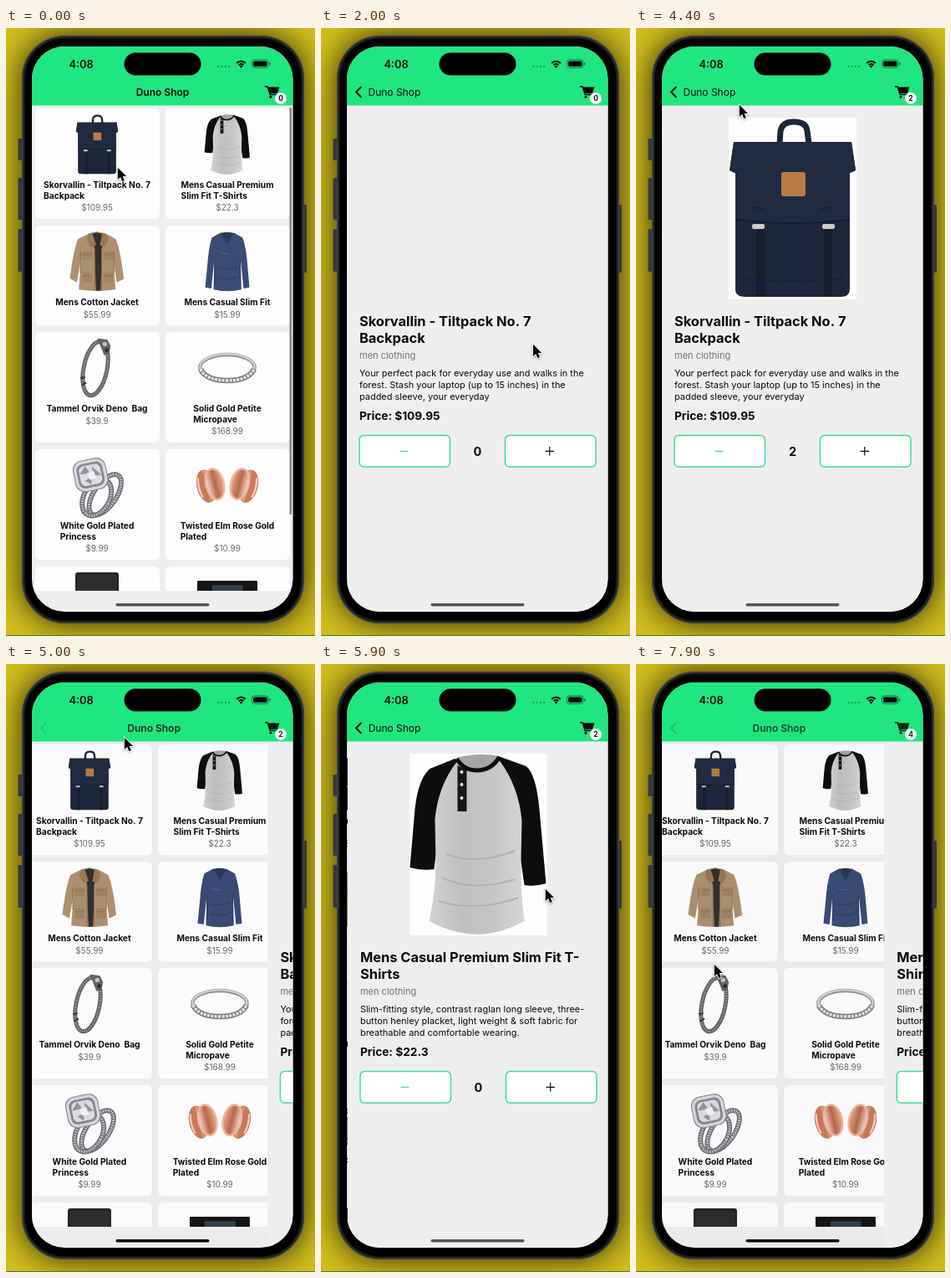
An HTML page with a canvas that plays this animation: 370x726 px, repeating every 8000 ms.

```html
<!DOCTYPE html>
<html lang="en">
<head>
<meta charset="utf-8">
<title>Shop app</title>
<style>
html, body { margin: 0; width: 100%; height: 100%; overflow: hidden; background: #cbb61b; }
canvas { display: block; width: 370px; height: 726px; }
</style>
</head>
<body>
<canvas id="stage"></canvas>
<script>
const W = 370, H = 726, LOOP = 8000;
const canvas = document.getElementById('stage');
const g = canvas.getContext('2d');
const dpr = window.devicePixelRatio || 1;
canvas.width = W * dpr;
canvas.height = H * dpr;

const GREEN = '#1fe67f', PAGE = '#eeeeee', INK = '#0b0b0b', GREY = '#6b6b6b';
const SCREEN = { x: 31, y: 22, w: 312.5, h: 675, r: 39 };
const SHOP = 'Duno Shop';

// ---- drawing helpers ----
function box(x, y, w, h, r, fill, stroke, lw = 1) {
  g.beginPath();
  g.roundRect(x, y, w, h, r);
  if (fill) { g.fillStyle = fill; g.fill(); }
  if (stroke) { g.strokeStyle = stroke; g.lineWidth = lw; g.stroke(); }
}
function oval(x, y, rx, ry, fill) {
  g.beginPath();
  g.ellipse(x, y, rx, ry, 0, 0, Math.PI * 2);
  g.fillStyle = fill;
  g.fill();
}
function disc(x, y, r, fill) {
  oval(x, y, r, r, fill);
}
function fillPath(d, color) {
  g.fillStyle = color;
  g.fill(new Path2D(d));
}
function line(d, color, lw, dash = []) {
  g.strokeStyle = color;
  g.lineWidth = lw;
  g.setLineDash(dash);
  g.stroke(new Path2D(d));
  g.setLineDash([]);
}
function ring(x, y, rx, ry, rot, color, lw, dash = []) {
  g.beginPath();
  g.ellipse(x, y, rx, ry, rot, 0, Math.PI * 2);
  g.strokeStyle = color;
  g.lineWidth = lw;
  g.setLineDash(dash);
  g.stroke();
  g.setLineDash([]);
}
function blend(x0, x1, ...colors) {
  const grad = g.createLinearGradient(x0, 0, x1, 0);
  colors.forEach((c, i) => grad.addColorStop(i / (colors.length - 1), c));
  return grad;
}
function setFont(size, weight) {
  g.font = `${weight} ${size}px Inter, "Liberation Sans", sans-serif`;
}
function text(s, x, y, size, weight = 400, color = INK, align = 'left') {
  setFont(size, weight);
  g.textAlign = align;
  g.fillStyle = color;
  g.fillText(s, x, y);
}
function group(draw, x = 0, y = 0, scale = 1) {
  g.save();
  g.translate(x, y);
  g.scale(scale, scale);
  draw();
  g.restore();
}
function faded(alpha, draw) {
  if (alpha <= 0) return;
  g.save();
  g.globalAlpha = Math.min(1, alpha);
  draw();
  g.restore();
}

// ---- product pictures, 216 units high ----
function backpack() {
  line('M61 31 L62 16 Q64 5 78 5 Q93 5 94 16 L96 31', '#1c2739', 7);
  fillPath('M6 29 H147 L152 63 L145 66 V205 Q145 214 134 214 H20 Q8 214 8 205 V66 L1 63 Z', '#1d273b');
  fillPath('M6 29 H147 L152 63 L144 67 L145 122 Q76 130 9 122 V67 L1 63 Z', '#202b41');
  line('M9 122 Q76 130 145 122', '#141c2c', 2);
  line('M15 192 Q76 198 138 192 M27 107 L42 109 M110 109 L125 107', '#172033', 1.5);
  box(33, 128, 10, 86, 1, '#151e2f');
  box(114, 128, 10, 86, 1, '#151e2f');
  box(28, 127, 15, 6, 2, '#c9c9c5');
  box(112, 127, 15, 6, 2, '#c9c9c5');
  box(63, 65, 29, 29, 3, '#b67c46');
}
function raglan() {
  fillPath('M54 6 L24 18 Q10 30 6 66 L0 136 Q14 140 29 138 L36 80 L62 20 Z', '#0d0d0f');
  fillPath('M106 3 L139 15 Q151 24 155 66 L163 155 Q150 159 137 157 L126 80 L102 20 Z', '#0d0d0f');
  fillPath('M56 10 Q34 38 30 78 L31 130 Q31 165 23 200 Q50 215 82 216 Q110 215 137 200 Q133 170 133 130 L134 80 Q130 38 107 8 Q98 22 80 22 Q64 20 56 10 Z',
    blend(24, 138, '#d2d2d3', '#c0c0c2', '#c6c6c7', '#d6d6d7'));
  fillPath('M56 5 Q82 -2 107 3 Q98 20 78 20 Q62 18 56 5 Z', '#a5a5a8');
  line('M56 6 Q64 20 80 20 Q98 20 107 4', '#0d0d0f', 5);
  fillPath('M57 14 L68 20 V69 H57 Z', '#161618');
  for (const y of [22, 37, 53]) disc(62, y, 2, '#ececec');
  line('M38 148 Q75 166 126 150 M34 176 Q80 190 130 172 M44 120 Q80 134 126 116', '#b2b2b5', 2);
}
function jacket() {
  fillPath('M66 8 L96 0 L130 8 L164 26 Q180 56 194 170 L168 182 L156 100 L164 208 Q98 218 32 208 L40 100 L25 182 L0 168 Q14 58 30 26 Z', '#ae9070');
  fillPath('M78 8 L96 4 L120 8 L116 60 L110 212 L94 212 L88 60 Z', '#33302d');
  fillPath('M66 8 L80 4 L94 48 L76 58 L60 30 Z M130 8 L116 4 L108 48 L124 58 L138 30 Z', '#987857');
  line('M89 60 V212 M114 60 V212 M38 70 V150 M158 70 V150', '#866a4c', 3);
  for (const x of [45, 121]) {
    box(x, 72, 34, 30, 2, '#a28362');
    box(x, 146, 34, 36, 2, '#a28362');
    line(`M${x} 82 h34 M${x} 158 h34`, '#84684b', 2);
  }
}
function henley() {
  fillPath('M54 5 Q78 12 104 5 L134 22 Q148 60 152 120 L159 200 L138 204 L127 100 L130 208 Q80 220 30 208 L33 100 L22 204 L0 200 L8 120 Q12 60 24 22 Z', '#3a4b75');
  fillPath('M58 5 Q80 0 100 5 L80 40 Z', '#2a3656');
  line('M56 5 L80 42 L103 5', '#2d3b60', 5);
  line('M34 100 V190 M126 100 V190 M46 130 Q80 142 118 124 M42 166 Q84 178 122 160', '#2c3a61', 3);
  line('M48 70 Q64 84 84 78', '#51648f', 3);
}
function bracelet() {
  ring(69, 110, 42, 98, 0.2, '#58585a', 15);
  ring(69, 110, 42, 98, 0.2, '#a4a4a6', 8, [4, 4]);
  fillPath('M76 2 L112 6 L124 30 L118 56 L100 62 L90 36 Z', '#636366');
  disc(103, 22, 8, '#c5c5c8');
  disc(110, 44, 7, '#2f2f32');
  line('M16 145 L32 140 M20 168 L36 161', '#3d3d40', 7);
}
function band() {
  ring(105, 106, 98, 46, 0, '#8e8e90', 13);
  ring(105, 104, 98, 46, 0, '#d2d2d4', 7);
  line('M9 112 Q28 152 105 153 Q182 152 201 112', '#808085', 20);
  line('M9 112 Q28 152 105 153 Q182 152 201 112', '#e6e6e8', 10, [9, 4]);
}
function diamond() {
  const bands = [[122, 142, 40, 84, 0.6], [92, 152, 46, 70, 0.5]];
  for (const b of bands) {
    ring(...b, '#6f7077', 18);
    ring(...b, '#c3c4ca', 9, [5, 4]);
  }
  g.save();
  g.translate(70, 72);
  g.rotate(-0.2);
  box(-60, -58, 120, 114, 34, '#85868e');
  box(-52, -50, 104, 98, 28, null, '#d8d9df', 10);
  box(-39, -37, 78, 72, 18, '#dcdde4');
  fillPath('M-38 -10 L-14 -36 L0 -8 Z M10 -30 L38 6 L8 4 Z M-24 16 L2 6 L-4 34 Z', '#92949f');
  fillPath('M-12 -10 L14 -14 L18 14 L-6 16 Z', '#f2f2f6');
  g.restore();
}
function roseRings() {
  for (const side of [1, -1]) {
    g.save();
    g.translate(114 - side * 62, 108);
    g.scale(side, 1);
    g.rotate(-0.25);
    oval(-14, 0, 34, 60, '#c97a5b');
    fillPath('M-14 -60 Q0 -48 18 -58 V58 Q0 48 -14 60 Z', '#dc9678');
    ring(18, 0, 32, 56, 0, '#efb89f', 7);
    oval(18, 0, 29, 52, blend(-11, 47, '#f6d3c3', '#b9684a', '#e3a388'));
    line('M-36 -36 Q-46 0 -36 36', '#f5cdb9', 7);
    g.restore();
  }
}
function drive() {
  box(0, 0, 156, 216, 10, '#232325');
  box(6, 8, 144, 200, 8, '#2d2d30');
}
function disk() {
  box(0, 30, 216, 180, 4, '#151517');
  box(54, 46, 110, 60, 2, '#33414a');
}

const items = [
  { art: backpack, w: 153, name: ['Skorvallin - Tiltpack No. 7', 'Backpack'], price: '$109.95' },
  { art: raglan, w: 164, name: ['Mens Casual Premium', 'Slim Fit T-Shirts'], price: '$22.3' },
  { art: jacket, w: 195, name: ['Mens Cotton Jacket'], price: '$55.99' },
  { art: henley, w: 159, name: ['Mens Casual Slim Fit'], price: '$15.99' },
  { art: bracelet, w: 150, name: ['Tammel Orvik Deno  Bag'], price: '$39.9' },
  { art: band, w: 210, name: ['Solid Gold Petite', 'Micropave'], price: '$168.99' },
  { art: diamond, w: 186, name: ['White Gold Plated', 'Princess'], price: '$9.99' },
  { art: roseRings, w: 228, name: ['Twisted Elm Rose Gold', 'Plated'], price: '$10.99' },
  { art: drive, w: 156, name: [], price: '' },
  { art: disk, w: 216, name: [], price: '' }
];
const rows = [[96, 132], [236, 119.5], [363, 132], [503, 132], [643, 132]];

const pages = [
  { item: items[0], title: ['Skorvallin - Tiltpack No. 7', 'Backpack'],
    about: ['Your perfect pack for everyday use and walks in the', 'forest. Stash your laptop (up to 15 inches) in the', 'padded sleeve, your everyday'] },
  { item: items[1], title: ['Mens Casual Premium Slim Fit T-', 'Shirts'],
    about: ['Slim-fitting style, contrast raglan long sleeve, three-', 'button henley placket, light weight & soft fabric for', 'breathable and comfortable wearing.'] }
];

// ---- screens ----
function card(item, x, y, h) {
  const mid = x + 74;
  box(x, y, 149, h, 6, '#fdfdfd');
  group(item.art, mid - item.w / 6, y + 7, 1 / 3);
  setFont(10.2, 700);
  const widest = Math.max(0, ...item.name.map(s => g.measureText(s).width));
  item.name.forEach((s, i) => text(s, mid - widest / 2, y + 95 + i * 12.5, 10.2, 700));
  text(item.price, mid, y + 97.3 + item.name.length * 12.4, 10, 400, GREY, 'center');
}
function list(t, cover) {
  g.save();
  g.beginPath();
  g.rect(SCREEN.x, 92, SCREEN.w, 580);
  g.clip();
  g.translate(-94 * cover, 0);
  items.forEach((item, i) => {
    const [y, h] = rows[i >> 1];
    card(item, i % 2 ? 191 : 35, y, h);
  });
  faded(1 - (t - 150) / 250, () => box(339.5, 95, 2.5, 486, 1.2, '#858585'));
  g.restore();
}
function detail(page, count, showText, showArt) {
  g.fillStyle = PAGE;
  g.fillRect(31, 92, 313, 606);
  if (!showText) return;
  if (showArt) {
    const { art, w } = page.item, x = 187.5 - w / 2;
    g.fillStyle = '#fdfdfd';
    g.fillRect(x, 107, w, 217);
    group(art, x, 107);
  }
  page.title.forEach((s, i) => text(s, 46, 355.5 + i * 20.7, 16.4, 700));
  text('men clothing', 46, 395, 11, 400, '#717171');
  page.about.forEach((s, i) => text(s, 46, 416 + i * 13.9, 10.95));
  text('Price: ' + page.item.price, 46, 468, 13.7, 700);
  for (const x of [46, 220.5]) box(x, 486.5, 108.5, 37.5, 5, '#ffffff', '#3be08f', 1.5);
  line('M94.5 505.3 h10', '#3be08f', 1.2);
  line('M268.5 505.3 h10.5 M273.75 500 v10.5', INK, 1.2);
  text(count, 187.5, 510.5, 14.5, 700, INK, 'center');
}
function header(cover, cart) {
  g.fillStyle = GREEN;
  g.fillRect(31, 22, 313, 70.5);
  faded(1 - 1.8 * cover, () => text(SHOP, 187.5 - 108 * cover, 81, 12, 600, INK, 'center'));
  faded((cover - 0.4) / 0.6, () => text(SHOP, 56.5 + 100 * (1 - cover), 81, 12));
  faded(cover * 1.2, () => line('M48.5 70 L42 76.5 L48.5 83', INK, 2));
  faded(1 - cover * (1 - cover), () => {
    line('M310 70 h3.2 l3 9.5 h9.5', INK, 1.6);
    fillPath('M313.5 70.5 H327.5 L325 78 H316 Z', INK);
    disc(317, 82.3, 1.6, INK);
    disc(324.5, 82.3, 1.6, INK);
    disc(329, 84, 7, '#ffffff');
    text(cart, 329, 87.1, 8.5, 700, INK, 'center');
  });
}
function statusBar() {
  text('4:08', 90, 47.5, 12.8, 600, INK, 'center');
  for (let i = 0; i < 4; i++) disc(254.5 + i * 4.2, 46, 1, '#138a4c');
  for (const r of [3.9, 7.3]) {
    g.beginPath();
    g.arc(281.5, 47, r, -Math.PI * 0.76, -Math.PI * 0.24);
    g.strokeStyle = INK;
    g.lineWidth = 2;
    g.stroke();
  }
  fillPath('M281.5 48 L279.5 45.6 Q281.5 44 283.5 45.6 Z', INK);
  box(294.5, 38, 19.5, 9.5, 3, null, '#14703f', 1);
  box(296, 39.5, 16.5, 6.5, 1.8, INK);
  box(315.2, 41, 1.2, 3.5, 0.6, '#14703f');
  box(141.5, 29.5, 92, 27, 13.5, '#000');
}
function phone() {
  g.fillStyle = '#d3be1c';
  g.fillRect(0, 0, W, H);
  g.save();
  g.shadowColor = 'rgba(0,0,0,.8)';
  g.shadowBlur = 36 * dpr;
  box(19, 9, 338, 702, 51, '#29292c');
  g.restore();
  for (const [y, h] of [[132, 26], [179, 50], [240, 51]]) box(14.5, y, 6, h, 1.5, '#37373a');
  box(355, 211, 5, 81, 1.5, '#37373a');
  box(19.8, 9.8, 336.4, 700.4, 50, '#202022', '#47474b', 1.2);
  box(22.5, 12.5, 331, 695, 48, '#000');
  g.fillStyle = '#4a7a2a';
  g.fillRect(0, 725, W, 1);
}

// ---- timing ----
const PUSH_1 = 150, POP_1 = 4755, PUSH_2 = 5350, POP_2 = 7690;
const TAPS = [3600, 3800, 6500, 6700];
const CURSOR = [
  [0, 133, 166], [200, 133, 166], [800, 254, 349], [1800, 254, 349],
  [2500, 250, 489], [3000, 249, 491], [3200, 250, 492], [3850, 250, 492],
  [4400, 123, 91], [4600, 90, 78], [4780, 90, 78], [5000, 141, 87],
  [5300, 262, 178], [5420, 262, 178], [5900, 268, 268], [6050, 268, 268],
  [6400, 252, 491], [6750, 252, 491], [7100, 81, 74], [7680, 81, 74], [7900, 93, 358], [8000, 96, 372]
];
function spring(ms) {
  const x = Math.max(0, ms) * 0.016;
  return 1 - (1 + x) * Math.exp(-x);
}
function coverAt(t) {
  if (t < POP_1) return spring(t - PUSH_1);
  if (t < PUSH_2) return 1 - spring(t - POP_1);
  if (t < POP_2) return spring(t - PUSH_2);
  return 1 - spring(t - POP_2);
}
function cursorAt(t) {
  const i = CURSOR.findIndex(k => k[0] > t);
  const [t0, x0, y0] = CURSOR[i - 1], [t1, x1, y1] = CURSOR[i];
  const u = (t - t0) / (t1 - t0), e = u * u * (3 - 2 * u);
  return [x0 + (x1 - x0) * e, y0 + (y1 - y0) * e];
}
function pointer(t) {
  const [x, y] = cursorAt(t);
  group(() => {
    const arrow = 'M0 0 V14.2 L3.3 11.2 L5.5 16.4 L8 15.3 L5.8 10.3 H10.2 Z';
    g.shadowColor = 'rgba(0,0,0,.35)';
    g.shadowBlur = 2.5 * dpr;
    g.shadowOffsetY = dpr;
    line(arrow, '#fff', 1.8);
    g.shadowColor = 'transparent';
    fillPath(arrow, '#000');
  }, x + 0.8, y + 0.8);
}

function draw(t) {
  g.setTransform(dpr, 0, 0, dpr, 0, 0);
  phone();
  const cover = coverAt(t);
  const second = t >= PUSH_2;
  const cart = TAPS.filter(tap => t >= tap).length;
  const popping = (t > POP_1 && t < PUSH_2) || t > POP_2;

  g.save();
  g.beginPath();
  g.roundRect(SCREEN.x, SCREEN.y, SCREEN.w, SCREEN.h, SCREEN.r);
  g.clip();
  g.fillStyle = PAGE;
  g.fillRect(31, 22, 313, 676);
  list(t, cover);
  g.fillStyle = `rgba(0,0,0,${0.1 * cover})`;
  g.fillRect(31, 92, 313, 606);
  group(() => detail(pages[+second], second ? cart - 2 : cart, t >= 1700, t >= 3100),
    SCREEN.w * (1 - cover) + (second ? 0.5 : 0));
  header(cover, cart);
  statusBar();
  box(131.5, 687, 112, 3.6, 1.8, popping ? '#000' : '#555');
  g.restore();
  pointer(t);
}

function tick(now) {
  draw(now % LOOP);
  requestAnimationFrame(tick);
}
requestAnimationFrame(tick);
</script>
</body>
</html>
```
